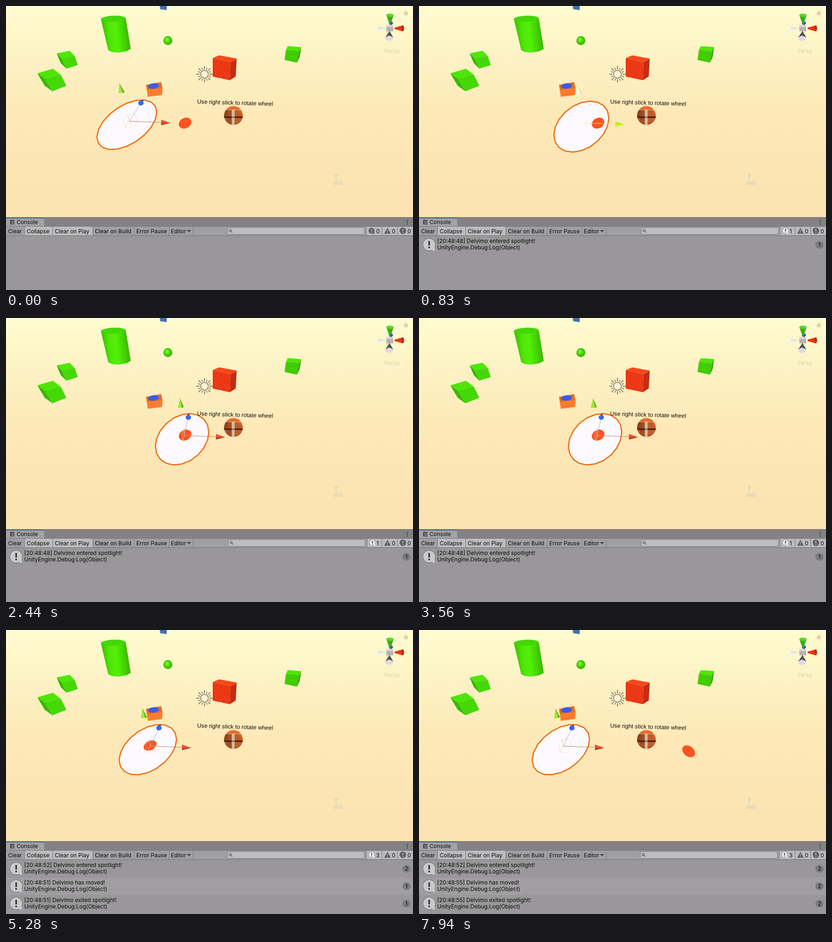
Recreate the animation shown at these times as an HTML page with a canvas. Size 884 by 616 pixels, loop 8000 ms.

```html
<!DOCTYPE html>
<html lang="en">
<head>
<meta charset="utf-8">
<style>
  html, body { margin: 0; width: 100%; height: 100%; overflow: hidden; background: #999799; }
  canvas { display: block; }
</style>
</head>
<body>
<canvas id="stage" width="884" height="616"></canvas>
<script>
const ctx = document.getElementById('stage').getContext('2d');
const LOOP = 8000;
const UI_FONT = '12px Inter, sans-serif';
const HERO = 'Delvimo';

// Event times in ms
const ENTER_1 = 760, LEAVE_1 = 3900, ENTER_2 = 4720, LEAVE_2 = 7700;

const mix = (a, b, u) => a + (b - a) * u;
const smooth = (t, start, end) => {
  const u = Math.min(1, Math.max(0, (t - start) / (end - start)));
  return u * u * (3 - 2 * u);
};

function gradient(x0, y0, x1, y1, ...colors) {
  const g = ctx.createLinearGradient(x0, y0, x1, y1);
  colors.forEach((c, i) => g.addColorStop(i / (colors.length - 1), c));
  return g;
}
function rect(color, x, y, w, h) {
  ctx.fillStyle = color;
  ctx.fillRect(x, y, w, h);
}
function path(pts, closed = true) {
  ctx.beginPath();
  for (let i = 0; i < pts.length; i += 2) ctx.lineTo(pts[i], pts[i + 1]);
  if (closed) ctx.closePath();
}
function poly(color, ...pts) {
  path(pts);
  ctx.fillStyle = color;
  ctx.fill();
}
function line(color, width, ...pts) {
  path(pts, false);
  ctx.strokeStyle = color;
  ctx.lineWidth = width;
  ctx.stroke();
}
function oval(color, x, y, rx, ry = rx, rot = 0) {
  ctx.beginPath();
  ctx.ellipse(x, y, rx, ry, rot, 0, 7);
  ctx.fillStyle = color;
  ctx.fill();
}
function ring(color, width, x, y, r) {
  ctx.beginPath();
  ctx.arc(x, y, r, 0, 7);
  ctx.strokeStyle = color;
  ctx.lineWidth = width;
  ctx.stroke();
}
function label(str, x, y, color = '#0b0b0b', font = UI_FONT, align = 'left') {
  ctx.font = font;
  ctx.fillStyle = color;
  ctx.textAlign = align;
  ctx.fillText(str, x, y);
}

function drawSolids() {
  poly('#3b74b4', 334, 0, 349, 0, 349, 9, 335, 7);

  // Cylinder
  poly(gradient(212, 64, 268, 58, '#3fc400', '#4fe806', '#52f006', '#46d404', '#3ab400'),
    206, 28, 260, 26, 271, 93, 262, 98, 246, 101, 230, 100, 222, 96);
  oval('#44d605', 233, 27.5, 27, 6.5, -0.04);

  const ball = ctx.createRadialGradient(349, 72, 1, 351, 75, 10);
  ball.addColorStop(0, '#7dff30');
  ball.addColorStop(0.35, '#50e808');
  ball.addColorStop(1, '#35a800');
  oval(ball, 351.5, 75, 9.7);

  // Green cubes
  poly('#4ee608', 110, 103, 138, 97, 149, 108, 121, 113);
  poly('#38b804', 110, 103, 121, 113, 131, 136, 119, 124);
  poly('#46d806', 121, 113, 149, 108, 156, 128, 131, 136);
  poly('#4ee608', 68, 146, 102, 136, 119, 149, 84, 157);
  poly('#38b804', 68, 146, 84, 157, 101, 185, 84, 173);
  poly('#46d806', 84, 157, 119, 149, 131, 173, 101, 185);
  poly('#4ee608', 612, 87, 641, 89, 637, 98, 608, 95);
  poly('#42cc06', 608, 95, 637, 98, 632, 123, 605, 117);
  poly('#349c04', 641, 89, 637, 98, 632, 123, 638, 110);

  // Red box
  poly('#f8481c', 449, 113, 463, 107, 501, 114, 488, 122);
  poly('#ec3814', 449, 113, 488, 122, 486, 161, 449, 153);
  poly('#c42c10', 488, 122, 501, 114, 499, 153, 486, 161);

  // Orange box with blue dome
  poly('#e8701e', 304, 171, 337, 165, 340, 179, 306, 183);
  poly('#ff7c2c', 306, 183, 340, 179, 339, 193, 308, 197);
  oval('#3c5cec', 320.5, 173.5, 12, 6, -0.1);

  // Striped ball
  ctx.save();
  ctx.beginPath();
  ctx.arc(494, 237.5, 20.5, 0, 7);
  ctx.clip();
  rect(gradient(0, 217, 0, 259, '#ec7030', '#d4642c', '#b85424'), 473, 216, 42, 43);
  poly('#8c4420', 473, 240, 476, 226, 484, 224, 482, 240);
  poly('#a44c22', 484, 226, 490, 224, 490, 258, 478, 250);
  poly('#c05c2a', 497, 226, 505, 224, 513, 238, 497, 240);
  rect('#4a2410', 473, 239.5, 42, 3.5);
  rect('#cfc0a4', 490.5, 225, 6, 33);
  rect('#8a7a60', 490.5, 239.5, 6, 3.5);
  ctx.restore();
}

function drawSun() {
  for (let i = 0; i < 16; i++) {
    const a = i * Math.PI / 8, r = i % 2 ? 15 : 18;
    line('#8d8672', 2, 431 + 11 * Math.cos(a), 148 + 11 * Math.sin(a),
      431 + r * Math.cos(a), 148 + r * Math.sin(a));
  }
  oval('#fbf3d6', 431, 148, 8.5);
  ring('#8d8672', 1.8, 431, 148, 8.5);
}

function drawSceneText() {
  ctx.save();
  ctx.translate(415, 211.5);
  ctx.rotate(0.031);
  label('Use right stick to rotate wheel', 0, 0, '#111',
    '12.6px "Liberation Sans", Arial, sans-serif');
  ctx.restore();
}

function drawOrientation() {
  poly('#e8e8e4', 804, 42, 823, 47, 823, 50, 806, 53);
  oval('#f6f6f4', 806, 47.5, 2, 5.5);
  oval('#3454d8', 836, 37, 4.5, 4);
  poly('#3cac10', 826, 20, 842, 20, 835, 39, 833, 39);
  oval('#58d828', 834, 20, 8, 3.5);
  rect('#b4b4b0', 826, 41, 15, 14);
  rect('#d4d4d0', 826, 41, 15, 5);
  poly('#e83414', 844, 47, 862, 42, 862, 55, 844, 50);
  oval('#ba2810', 862, 48.5, 2.5, 6.5);
  oval('#dcdce0', 832, 69, 8.5, 7);
  poly('#54545a', 833, 54, 841, 68, 832, 64, 824, 68);
  ctx.globalAlpha = 0.5;
  rect('#b4ac98', 864.5, 14, 8, 6);
  ring('#b4ac98', 1.2, 868.5, 13, 2.6);
  ctx.globalAlpha = 1;
  label('Persp', 822, 102, '#d8ceb4');
}

function drawScene() {
  rect(gradient(0, 0, 0, 458, '#fefcd0', '#fdf2c4', '#fde9b8', '#fce5b4', '#fbe2b0'), 0, 0, 884, 458);
  drawSolids();

  // Faint helpers
  ctx.globalAlpha = 0.5;
  ctx.strokeStyle = '#fffbe8';
  ctx.lineWidth = 1;
  ctx.strokeRect(430.5, 193.5, 138, 32);
  line('#fffbe8', 1, 430.5, 50, 430.5, 193);
  ctx.globalAlpha = 1;
  oval('#e9d9b4', 717, 367, 4.5);
  rect('#e9d9b4', 716, 368, 2.5, 13);
  rect('#e9d9b4', 711, 381, 21, 7);
  rect('#e9d9b4', 723, 378, 6, 2);

  drawSun();
  drawOrientation();
}

// Lying disc: u = 0 at its leftmost pose, 1 at its rightmost
function drawSpotlight(u) {
  const cx = mix(262.5, 382.5, u), cy = mix(257.5, 263, u);
  const w = mix(65, 58, u), h = mix(54, 55.7, u);
  const phase = Math.acos(mix(-0.5, -0.275, u));
  const pts = [];
  for (let i = 0; i < 20; i++) {
    const a = i * Math.PI / 10;
    pts.push(cx + w * Math.cos(a), cy + h * Math.cos(a + phase));
  }
  poly('#fcfaff', ...pts);
  ctx.lineJoin = 'round';
  ctx.strokeStyle = '#f06a10';
  ctx.lineWidth = 2.6;
  ctx.stroke();
}

function drawHandles(u, dragging) {
  const at = (x0, y0, x1, y1) => [mix(x0, x1, u), mix(y0, y1, u)];
  const origin = at(268, 250, 387, 255), [ox, oy] = origin;
  const up = at(250.5, 186, 379, 192), upTip = at(246, 167, 378, 174);
  const back = at(293, 210.5, 396, 215.5), backTip = at(298, 203, 397.5, 207);
  const side = at(337, 252.5, 456, 257.5);

  if (dragging) {
    line('#f2e86a', 1, ox, oy, ...side);
    line('#b8b8b4', 1, back[0] - 3, back[1] - 2, ...back, back[0] + 4, back[1] + 1);
    poly('#fbf6e4', ...upTip, up[0] + 7, up[1] + 3, up[0] - 7, up[1] + 4);
    poly('#d2c8a8', ...upTip, up[0] + 7, up[1] + 3, up[0] + 4, up[1] + 1);
  } else {
    const x = [17, 0.7], y = [mix(-4, -1, u), -15], z = [mix(9, 4, u), -13];
    const plane = (color, a, b, sign) => {
      path([ox, oy, ox + a[0], oy + a[1], ox + a[0] + sign * b[0], oy + a[1] + sign * b[1],
        ox + sign * b[0], oy + sign * b[1]]);
      ctx.strokeStyle = color;
      ctx.lineWidth = 1;
      ctx.stroke();
    };
    ctx.globalAlpha = 0.6;
    plane('#bcd4c4', x, y, 1);
    plane('#f4d4a0', y, z, -1);
    plane('#e4e8a8', x, z, -1);
    ctx.globalAlpha = 1;
    line('#c08068', 1, ox, oy, ...side);
    line('#a4b4c4', 1, ox, oy, ...back);
    poly('#9cec38', ...upTip, up[0] + 7, up[1] + 1, up[0] + 5, up[1] + 3, up[0] - 6, up[1] + 3);
    poly('#68a824', ...upTip, up[0] + 7, up[1] + 1, up[0] + 3, up[1] + 2);
    poly('#203a88', ...backTip, back[0] + 5, back[1] + 3, back[0] - 4, back[1] - 3);
    oval('#3a68e4', back[0], back[1], 5.8, 5.3);
  }
  const [sx, sy] = side;
  poly(dragging ? '#b8f01c' : '#ec5030', sx, sy - 6, sx + 20, sy + 1, sx, sy + 6);
  poly(dragging ? '#e4e830' : '#b43820', sx, sy + 2, sx + 20, sy + 1, sx, sy + 6);
}

function drawTarget(t) {
  const color = '#fb5420';
  if (t < LEAVE_1) oval(color, 389, 254, 14.3, 11.2, -0.5);
  else if (t < LEAVE_2) oval(color, 313, 250.5, 15, 10, -0.5);
  else oval(color, 585.7, 263, 15.5, 11, 0.65);
}

function bubble(x, y, r, fill, mark) {
  poly(fill, x + r * 0.2, y + r * 0.8, x + r * 0.9, y + r * 0.3, x + r * 0.95, y + r * 1.1);
  oval(fill, x, y, r);
  rect(mark, x - r * 0.12, y - r * 0.6, r * 0.25, r * 0.75);
  oval(mark, x, y + r * 0.48, r * 0.15);
}

function drawToolbar(count) {
  rect('#838284', 0, 458, 884, 20);
  rect('#6c6b6d', 0, 458, 884, 1);
  rect('#a3a2a4', 0, 459, 83, 19);
  rect('#4c7496', 0, 459, 83, 2);
  rect('#3c3b3d', 9, 464, 9, 10);
  for (let y = 466; y < 473; y += 2) rect('#a3a2a4', 11, y, 6, 1);
  label('Console', 23, 473);
  for (let y = 464; y < 474; y += 4) rect('#2c2c2c', 870.5, y, 2, 2);

  rect('#a09fa1', 0, 478, 884, 20);
  rect('#bcbbbd', 41, 478, 60, 20);
  rect('#bcbbbd', 102, 478, 86, 20);
  rect('#747375', 0, 477.5, 884, 1);
  rect('#747375', 0, 497.5, 884, 1);
  const shift = count === 1 ? 2 : 0;
  for (const x of [40, 101, 188, 278, 354, 406, 782 + shift, 816, 850]) rect('#7c7b7d', x, 478, 1, 20);
  rect('#bab9bb', 783 + shift, 479, 33 - shift, 18);
  rect('#bab9bb', 817, 479, 33, 18);
  rect('#bab9bb', 851, 479, 33, 18);

  const buttons = [['Clear', 4.5], ['Collapse', 45], ['Clear on Play', 106],
    ['Clear on Build', 193], ['Error Pause', 283], ['Editor', 358]];
  for (const [name, x] of buttons) label(name, x, 492.5);
  poly('#3c3c3c', 393, 486, 402, 486, 397.5, 490.5);

  // Search field
  ctx.beginPath();
  ctx.roundRect(480.5 + shift, 480.5, 298, 15, 4);
  ctx.fillStyle = '#bdbcbe';
  ctx.fill();
  ctx.strokeStyle = '#7a797b';
  ctx.lineWidth = 1;
  ctx.stroke();
  ring('#5c5b5d', 1.2, 487 + shift, 487, 2.3);
  line('#5c5b5d', 1.4, 489 + shift, 489, 491.5 + shift, 491.5);

  // Counters
  if (count) {
    ring('#807f81', 1, 794 + shift, 487.5, 7);
    bubble(794 + shift, 487.5, 6.5, '#e4e3e5', '#3a3a3a');
  } else bubble(794, 487.5, 6.5, '#626163', '#bab9bb');
  label(count, 804 + (shift ? 1 : 0), 492.5);
  poly('#5e5d5f', 828.5, 481, 835.5, 494, 821.5, 494);
  rect('#bab9bb', 827.7, 485.5, 1.6, 4);
  rect('#bab9bb', 827.7, 491, 1.6, 1.6);
  label(0, 838, 492.5);
  oval('#5e5d5f', 862, 487.5, 7);
  rect('#bab9bb', 861, 483, 2, 5.5);
  rect('#bab9bb', 861, 490, 2, 2);
  label(0, 872, 492.5);
}

function drawMessage(row, second, action, repeats) {
  const y = 499 + row * 37.8;
  ring('#777678', 1.4, 22, y + 18.5, 13.5);
  bubble(22, y + 18.5, 13, '#c9c8ca', '#2c2c2c');
  label(`[20:48:${second}] ${HERO} ${action}!`, 39.5, y + 15);
  label('UnityEngine.Debug:Log(Object)', 39.5, y + 29);
  oval('#7b7a7c', 869.8, y + 19, 9, 8.3);
  label(repeats, 869.8, y + 23.3, '#0b0b0b', UI_FONT, 'center');
}

function drawConsole(t) {
  rect('#999799', 0, 498, 884, 118);
  const count = t < ENTER_1 ? 0 : t < LEAVE_1 ? 1 : 3;
  if (count === 3) rect('#a09ea0', 0, 537, 884, 37.5);
  drawToolbar(count);
  if (count) {
    const again = t >= ENTER_2;
    drawMessage(0, again ? 52 : 48, 'entered spotlight', again ? 2 : 1);
  }
  if (count === 3) {
    const again = t >= LEAVE_2;
    drawMessage(1, again ? 55 : 51, 'has moved', again ? 2 : 1);
    drawMessage(2, again ? 55 : 51, 'exited spotlight', again ? 2 : 1);
  }
}

function draw() {
  const t = performance.now() % LOOP;
  const u = smooth(t, 200, 1135) - 0.62 * smooth(t, 4300, 5070);
  const dragging = (t > 180 && t < 1200) || (t > 4280 && t < 5150);
  drawScene();
  drawSpotlight(u);
  drawTarget(t);
  drawHandles(u, dragging);
  drawSceneText();
  drawConsole(t);
  requestAnimationFrame(draw);
}
draw();
</script>
</body>
</html>
```
